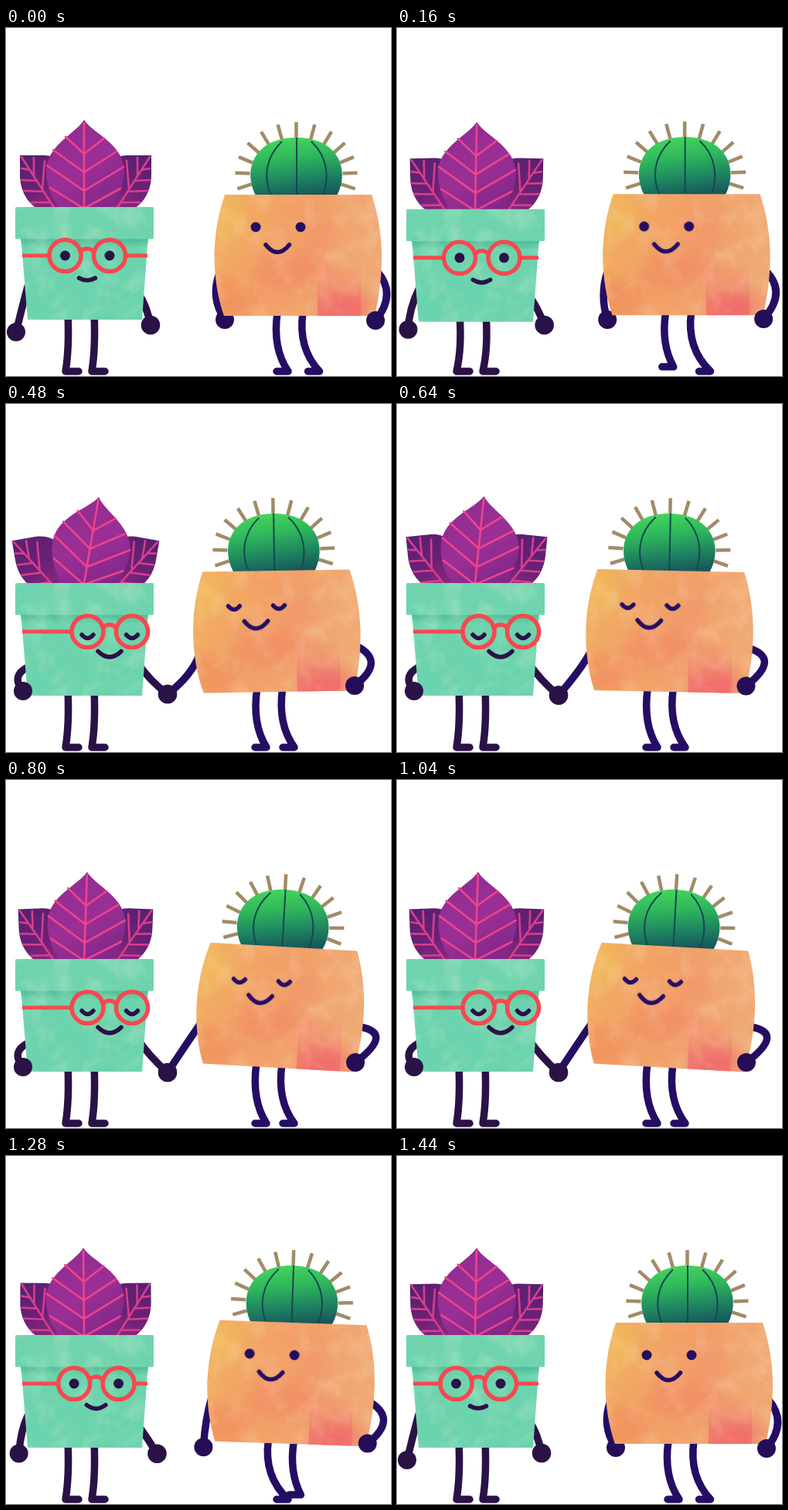
Write an HTML page that moves like this. It is 498x451 px and loops after 1520 ms.

```html
<!DOCTYPE html>
<html lang="en">
<head>
<meta charset="utf-8">
<title>Plant friends</title>
<style>
  html, body { margin: 0; width: 100%; height: 100%; overflow: hidden; background: #fff; }
  svg { display: block; width: 100vw; height: 100vh; }
  .limb { fill: none; stroke-width: 9.5; stroke-linecap: round; stroke-linejoin: round; }
  .ink { fill: none; stroke-linecap: round; stroke-width: 5.5; }
  .vein { fill: none; stroke-linecap: round; stroke-width: 2.6; }
</style>
</head>
<body>
<svg viewBox="0 0 498 451">
  <defs>
    <linearGradient id="leafFill" x1="0" y1="0" x2=".6" y2="1">
      <stop offset="0" stop-color="#8f2c92"/><stop offset=".6" stop-color="#9a2f94"/><stop offset="1" stop-color="#82278a"/>
    </linearGradient>
    <linearGradient id="sideFill" x1="0" y1="0" x2=".5" y2="1">
      <stop offset="0" stop-color="#55206f"/><stop offset=".55" stop-color="#6a2176"/><stop offset="1" stop-color="#8d2a80"/>
    </linearGradient>
    <linearGradient id="cactusFill" x1=".4" y1="0" x2=".6" y2="1">
      <stop offset="0" stop-color="#45d55c"/><stop offset=".35" stop-color="#2fb75c"/>
      <stop offset=".7" stop-color="#1f8560"/><stop offset="1" stop-color="#17585c"/>
    </linearGradient>
    <linearGradient id="boxFill" x1="0" y1="0" x2="1" y2=".25">
      <stop offset="0" stop-color="#f1b35f"/><stop offset=".45" stop-color="#f2a066"/><stop offset="1" stop-color="#f0a873"/>
    </linearGradient>
    <linearGradient id="pinkFill" x1="0" y1="0" x2="0" y2="1">
      <stop offset="0" stop-color="#f1706a" stop-opacity="0"/><stop offset="1" stop-color="#f0646a" stop-opacity=".75"/>
    </linearGradient>
    <linearGradient id="rimShade" x1="0" y1="0" x2="0" y2="1">
      <stop offset="0" stop-color="#4dbb97"/><stop offset="1" stop-color="#4dbb97" stop-opacity="0"/>
    </linearGradient>
    <filter id="soft" x="-50%" y="-50%" width="200%" height="200%"><feGaussianBlur stdDeviation="11"/></filter>
    <filter id="wash" x="0" y="0" width="100%" height="100%">
      <feTurbulence type="fractalNoise" baseFrequency=".035" numOctaves="4" seed="4"/>
      <feColorMatrix values="0 0 0 0 1  0 0 0 0 .95  0 0 0 0 .75  2.4 0 0 0 -1.05"/>
    </filter>
    <path id="boxShape" d="M283 216H473C481 240 486 268 486 297C486 325 482 350 477 373H282C274 350 269.5 322 269.5 295C270 265 275 240 283 216Z"/>
    <clipPath id="boxClip"><use href="#boxShape"/></clipPath>
    <path id="domeShape" d="M323 217C305 182 323 142 375.5 142C428 142 446 182 428 217Z"/>
    <clipPath id="potClip"><path d="M12 232H191V273H184L176 378H28L19 273H12Z"/></clipPath>
    <g id="sideLeaf">
      <path fill="url(#sideFill)" d="M18 165H50C76 166 95 190 95 242H58C34 236 18 217 18 190Z"/>
      <path class="vein" stroke="#d93d8c" d="M20 167L64 236M31 184L20 182M40 198L20 197M49 212L23 211M57 226L33 226M36 192V168M47 208L50 172"/>
    </g>
  </defs>

  <g stroke="#2a1247">
    <path class="limb" id="legA"/><path class="limb" id="legB"/>
    <path class="limb" id="armA"/><path class="limb" id="armB"/>
  </g>
  <g id="pot">
    <g class="side"><use href="#sideLeaf"/></g>
    <g transform="matrix(-1 0 0 1 206 0)"><g class="side"><use href="#sideLeaf"/></g></g>
    <g id="leaf">
      <path fill="url(#leafFill)" d="M101 119C112 137 153 150 153 186C153 207 141 226 127 243H78C62 226 52 208 52 186C52 152 90 137 101 119Z"/>
      <path class="vein" stroke="#ef438c" d="M101 123V240M77 141L101 163L127 143M61 158L101 187L143 160M53 178L101 211L152 180M57 207L101 234L148 208"/>
    </g>
    <path fill="#6bd3ad" d="M19 268H184L176 378H28Z"/>
    <path fill="url(#rimShade)" d="M19 273H184L183 285H20Z"/>
    <rect x="12" y="232" width="179" height="41.500" rx="1.500" fill="#6fd4ae"/>
    <g clip-path="url(#potClip)">
      <rect x="12" y="232" width="180" height="147" filter="url(#wash)" opacity=".24"/>
    </g>
    <path id="temples" class="ink" stroke="#f7474f" style="stroke-linecap:butt;stroke-width:5"/>
    <g id="faceA">
      <g fill="none" stroke="#f7474f" stroke-width="5.5">
        <circle cx="76.500" cy="295" r="20.500"/><circle cx="134" cy="295" r="20.500"/>
        <path d="M96 292Q98 286 105 286Q112 286 114 292"/>
      </g>
      <g class="open" fill="#2a1247"><circle cx="76.500" cy="295" r="6.500"/><circle cx="134" cy="295" r="6.500"/></g>
      <path class="ink shut" stroke="#2a1247" d="M69 299Q76.500 308 84 299M126.500 299Q134 308 141.500 299"/>
      <path class="ink" id="smile" stroke="#2a1247"/>
    </g>
  </g>

  <g stroke="#250d64">
    <path class="limb" id="legC"/><path class="limb" id="legD"/>
    <path class="limb" id="armC"/><path class="limb" id="armD"/>
  </g>
  <circle id="handC" r="12" fill="#250d57"/>
  <g id="box">
    <path id="spikes" stroke="#a18b68" stroke-width="4.500"/>
    <use href="#domeShape" fill="url(#cactusFill)"/>
    <path fill="none" stroke="#15494f" stroke-width="2" d="M376 142V217M357 147C335 168 333 195 343 217M395 147C417 168 418 195 410 217"/>
    <use href="#boxShape" fill="url(#boxFill)"/>
    <g clip-path="url(#boxClip)">
      <g filter="url(#soft)">
        <ellipse cx="287" cy="246" rx="20" ry="26" fill="#f1bd59" opacity=".7"/>
        <ellipse cx="290" cy="350" rx="34" ry="26" fill="#f28b5c" opacity=".65"/>
        <ellipse cx="372" cy="316" rx="52" ry="24" fill="#f2855f" opacity=".6"/>
        <ellipse cx="405" cy="270" rx="16" ry="40" fill="#f28a68" opacity=".45"/>
        <ellipse cx="440" cy="362" rx="32" ry="16" fill="#f0526a" opacity=".6"/>
      </g>
      <rect x="403" y="305" width="56" height="70" fill="url(#pinkFill)"/>
      <rect x="268" y="214" width="220" height="161" filter="url(#wash)" opacity=".2"/>
    </g>
    <g class="open" fill="#250d64"><circle cx="323" cy="258" r="6.500"/><circle cx="381" cy="258" r="6.500"/></g>
    <path class="ink shut" stroke="#250d64" d="M315.500 261Q323 270 330.500 261M373.500 261Q381 270 388.500 261"/>
    <path class="ink" stroke="#250d64" d="M336 281Q351 300 366.500 281"/>
  </g>
  <circle id="handA" r="12" fill="#2a1247"/>
  <circle id="handB" r="12.300" fill="#2a1247"/>
  <circle id="handD" r="12" fill="#250d57"/>
</svg>
<script>
const STEP = 80, LOOP = 1520;
const $ = id => document.getElementById(id);
const set = (id, name, value) => $(id).setAttribute(name, value);

// Monotone cubic through (times, values): no overshoot between keys.
function ease(times, values, t) {
  const last = times.length - 1;
  if (t >= times[last]) return values[last];
  let i = 0;
  while (t >= times[i + 1]) i++;
  const slope = j => (values[j + 1] - values[j]) / (times[j + 1] - times[j]);
  const tangent = j => {
    if (j === 0 || j === last) return 0;
    const a = slope(j - 1), b = slope(j);
    return a * b <= 0 ? 0 : 2 * a * b / (a + b);
  };
  const h = times[i + 1] - times[i], u = (t - times[i]) / h, v = 1 - u;
  return values[i] * v * v * (1 + 2 * u) + values[i + 1] * u * u * (3 - 2 * u)
    + h * u * v * (tangent(i) * v - tangent(i + 1) * u);
}

// Key moments in steps: rest, stride, touch, lean, lean, part, rest.
const KEYS = [0, 1, 4, 6, 10, 13, 15, 18];
const pose = (rest, stride, touch, lean, part, end = rest) =>
  [rest, rest, stride, touch, lean, lean, part, end];

const tracks = {
  sink: pose(0, 11, 0, 0, 0),
  tilt: pose(0, 6, 9.7, 2, -1, 1),
  look: pose(0, 21.5, 29, 29, 19),
  boxX: pose(0, -17.5, -27.5, -23, -15),
  boxY: pose(0, -3.2, 0, 0, 0),
  boxR: pose(0, 0, -0.9, 3.2, 2.8)
};

// Shoulder, bend, hand.
const arms = {
  A: pose([28, 335, 20, 365, 13, 394], [30, 345, 2, 362, 20, 378], [30, 340, 5, 352, 22, 372],
    [30, 340, 5, 352, 22, 372], [28, 338, 18, 352, 19, 380]),
  B: pose([172, 345, 182, 360, 187, 385], [170, 355, 185, 375, 204, 385], [170, 335, 185, 358, 209, 376],
    [170, 335, 185, 358, 209, 379], [172, 352, 185, 370, 201, 386]),
  C: pose([276, 318, 264, 350, 283, 378], [258, 305, 252, 335, 230, 378], [250, 325, 240, 352, 209, 376],
    [252, 315, 238, 335, 209, 379], [260, 310, 252, 338, 237, 377]),
  D: pose([480, 315, 506, 345, 478, 379], [462, 312, 500, 335, 459, 369], [450, 312, 494, 332, 451, 365],
    [458, 320, 502, 328, 452, 366], [465, 320, 508, 338, 461, 369])
};

const feet = {
  C: {
    x: [[0, 1, 4, 13, 15], [0, 0, -28, -28, 0]],
    y: [[0, 1, 2.5, 4, 13, 14, 15], [0, 0, -8, 0, 0, -8, 0]]
  },
  D: {
    x: [[0, 2, 4, 6, 15, 18], [0, 0, -8, -32.5, -32.5, 0]],
    y: [[0, 2, 4, 6, 15, 16.5, 18], [0, 0, -8, 0, 0, -8, 0]]
  }
};

function spikes() {
  let d = '';
  for (let i = -6; i <= 6; i++) {
    const a = i * 17.6 * Math.PI / 180, s = Math.sin(a), c = Math.cos(a);
    d += `M${375.5 + 60 * s} ${190 - 46 * c}L${375.5 + 79 * s} ${190 - 68 * c}`;
  }
  set('spikes', 'd', d);
}

function drawArm(id, k) {
  const [sx, sy, cx, cy, hx, hy] = arms[id][0].map((_, n) => ease(KEYS, arms[id].map(p => p[n]), k));
  set('arm' + id, 'd', `M${sx} ${sy}Q${cx} ${cy} ${hx} ${hy}`);
  set('hand' + id, 'cx', hx);
  set('hand' + id, 'cy', hy);
}

function drawStep(id, k, hipX, heelX, p) {
  const r = p.boxR * Math.PI / 180, dx = hipX - 378, dy = 74;
  const x = 378 + p.boxX + dx * Math.cos(r) - dy * Math.sin(r);
  const y = 295 + p.boxY + dx * Math.sin(r) + dy * Math.cos(r);
  const fx = heelX + ease(...feet[id].x, k), fy = 445 + ease(...feet[id].y, k);
  set('leg' + id, 'd', `M${x} ${y}Q${x - 6.5} ${fy - 30} ${fx} ${fy}H${fx - 15}`);
}

function drawLeg(id, hip, heel, toe, sink) {
  set('leg' + id, 'd', `M${hip + sink * .4} ${370 + sink}Q${hip + 2 + sink * .7} 415 ${heel} 445H${toe}`);
}

function draw(ms) {
  const k = Math.floor((ms % LOOP) / STEP);
  const p = {};
  for (const name in tracks) p[name] = ease(KEYS, tracks[name], k);

  set('pot', 'transform', `translate(0 ${p.sink})`);
  set('leaf', 'transform', `rotate(${p.tilt} 101 232)`);
  document.querySelectorAll('.side').forEach(g => g.setAttribute('transform', `rotate(${-p.tilt} 85 232)`));
  set('faceA', 'transform', `translate(${p.look} 0)`);
  const right = 154 + p.look;
  set('temples', 'd', `M21 295H${56 + p.look}` + (right < 183 ? `M${right} 295H183` : ''));
  const s = p.look / 29, w = 10.5 + 4.5 * s, y = 324 - 3.5 * s;
  set('smile', 'd', `M${105 - w} ${y}Q105 ${y + 6 + 9 * s} ${105 + w} ${y}`);

  set('box', 'transform', `translate(${p.boxX} ${p.boxY}) rotate(${p.boxR} 378 295)`);
  drawLeg('A', 80, 77, 94, p.sink);
  drawLeg('B', 114, 111, 128, p.sink);
  drawStep('C', k, 351, 365, p);
  drawStep('D', k, 384, 405.5, p);
  for (const id in arms) drawArm(id, k);

  const shut = k >= 6 && k <= 13;
  document.querySelectorAll('.open').forEach(e => e.style.display = shut ? 'none' : '');
  document.querySelectorAll('.shut').forEach(e => e.style.display = shut ? '' : 'none');
}

spikes();
draw(0);
let start;
function tick(now) {
  start ??= now;
  draw(now - start);
  requestAnimationFrame(tick);
}
requestAnimationFrame(tick);
</script>
</body>
</html>
```
